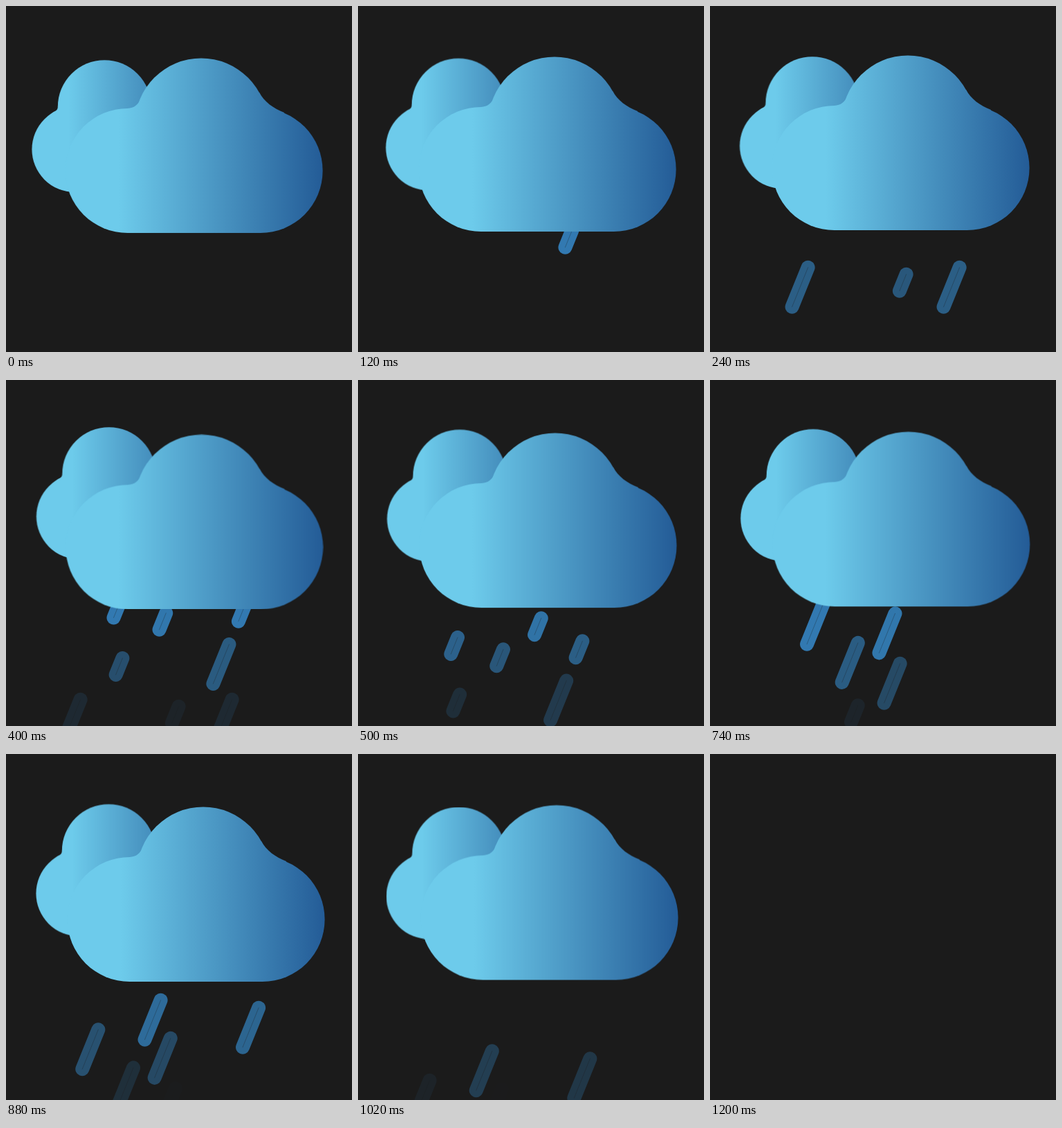
An HTML page that plays this animation: 500 px wide and 500 px high, repeating every 1.22 s.

```html
<!DOCTYPE html>
<html lang="en">
<head>
<meta charset="utf-8">
<title>Rain cloud</title>
<style>
html, body { margin: 0; width: 100%; height: 100%; overflow: hidden; background: #1b1b1b; }
svg { display: block; width: 100vw; height: 100vh; }
line { stroke-linecap: round; stroke: #3482be; stroke-width: 20; }
.core { stroke: #1b1b1b; stroke-width: .6; opacity: .5; }
#scene { animation: blink 1220ms step-end infinite; }
#front { animation: sway 1220ms ease-in-out infinite; }
#back { animation: drift 1220ms ease-in-out infinite; }

@keyframes blink { 98.36% { visibility: hidden; } }
@keyframes sway {
  0% { transform: translate(0, 0); }
  19.7% { transform: translate(4px, -4px); }
  32.8% { transform: translate(.5px, 3.5px); }
  50.8% { transform: translate(6px, -2px); }
  72.1% { transform: translate(3px, 1px); }
  83.6%, 100% { transform: translate(5px, -1.5px); }
}
@keyframes drift {
  0% { transform: translate(0, 0); }
  19.7% { transform: translate(5.5px, -5px); }
  32.8% { transform: translate(6.5px, -10px); }
  50.8% { transform: translate(2px, -2px); }
  64% { transform: translate(7.5px, -8px); }
  83.6%, 100% { transform: translate(3.5px, -1.5px); }
}
</style>
</head>
<body>
<svg viewBox="0 0 500 500">
  <defs>
    <linearGradient id="frontFill" gradientUnits="userSpaceOnUse" x1="163" y1="0" x2="457" y2="0">
      <stop offset="0" stop-color="#6dcbeb"/>
      <stop offset="1" stop-color="#245c97"/>
    </linearGradient>
    <linearGradient id="backFill" gradientUnits="userSpaceOnUse" x1="90" y1="0" x2="300" y2="0">
      <stop offset="0" stop-color="#6dcbeb"/>
      <stop offset="1" stop-color="#245c97"/>
    </linearGradient>
  </defs>
  <g id="scene">
    <g id="rain"></g>
    <g id="back" fill="url(#backFill)">
      <circle cx="99.2" cy="207.2" r="61.8"/>
      <circle cx="142.3" cy="145.7" r="67.5"/>
      <path d="M66 155C71 151.5 75 151 75 145L90 150Z"/>
    </g>
    <g id="front" fill="url(#frontFill)">
      <circle cx="175.7" cy="238" r="90"/>
      <circle cx="282" cy="171.3" r="95.8"/>
      <circle cx="367.6" cy="238" r="90"/>
      <path d="M175.7 148C185 147.5 191 143 195 133L366 125C373 138 386 148 402 154L367.6 328H175.7Z"/>
    </g>
  </g>
</svg>
<script>
const LOOP = 1220, STEP = 20;
const SPEED = .525, SLANT = -.405;
const EDGE = 330, LANE_X = 161, LANE_GAP = 36.5;
const rain = document.getElementById('rain');

// For each lane, the times at which drops leave the cloud.
const longDrops = [[149, 750, 1045], [], [645, 831], [726], [588], [301], [149, 810, 1045]];
const shortDrops = [[420], [263], [387], [473], [130], [410], []];

const drops = [...makeDrops(longDrops, 57), ...makeDrops(shortDrops, 24)];

function makeDrops(lanes, height) {
  return lanes.flatMap((times, lane) => times.map(time => {
    const g = add(rain, 'g');
    const end = { x2: height * SLANT, y2: height };
    add(g, 'line', end);
    add(g, 'line', { ...end, class: 'core' });
    return { g, time, x: LANE_X + lane * LANE_GAP };
  }));
}

function add(parent, name, attrs = {}) {
  const el = document.createElementNS('http://www.w3.org/2000/svg', name);
  for (const key in attrs) el.setAttribute(key, attrs[key]);
  return parent.appendChild(el);
}

// Drops appear behind the cloud's edge and fade with the depth of the fall.
function opacityAt(y) {
  return y < 319 ? 0 : Math.max(0, Math.min(.92, (485 - y) / 165));
}

function draw(t) {
  for (const { g, time, x } of drops) {
    const fall = (t - time) * SPEED, y = EDGE + fall;
    g.setAttribute('transform', `translate(${x + fall * SLANT} ${y})`);
    g.setAttribute('opacity', opacityAt(y));
  }
}

const start = performance.now();
function tick() {
  const t = (performance.now() - start) % LOOP;
  draw(Math.floor(t / STEP) * STEP);
  requestAnimationFrame(tick);
}
tick();
</script>
</body>
</html>
```
